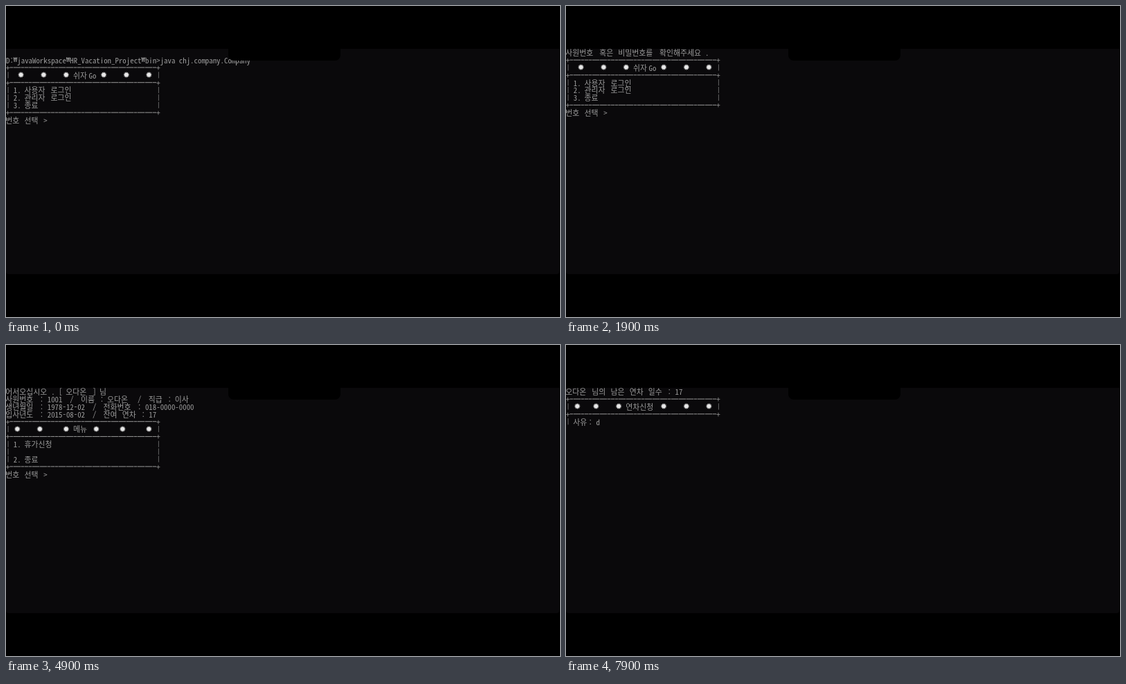
Write an HTML page that moves like this. It is 800 px wide and 450 px high and loops after 8000 ms.

```html
<!DOCTYPE html>
<html lang="ko">
<head>
<meta charset="utf-8">
<title>Console</title>
<style>
html, body { margin: 0; width: 100%; height: 100%; overflow: hidden; background: #000; }
#stage { position: absolute; left: 0; top: 0; width: 800px; height: 450px; overflow: hidden; background: #000; }
#console { position: absolute; left: 0; top: 62px; width: 799px; height: 326px; overflow: hidden;
  background: #0a090b; border-radius: 0 0 4px 4px; }
#notch { position: absolute; left: 320.5px; top: 0; width: 162px; height: 16.5px; background: #000;
  border-radius: 0 0 8px 8px; }
/* 8 x 16 character grid, shown at reduced size */
#grid { position: absolute; left: 0; top: 0; transform-origin: 0 0; transform: scale(.6788);
  font: 16px/16px "Noto Sans Mono CJK KR", "Noto Sans CJK KR", "Noto Sans CJK", monospace; color: #9c9c9c; }
#grid span { position: absolute; height: 16px; white-space: pre; font-kerning: none; }
#grid .hangul { margin-left: -1px; }
#grid .rule { color: transparent; overflow: hidden;
  background: repeating-linear-gradient(90deg, #959595 0 7px, #4a4a4a 7px 8px) 0 7.2px / 100% 1.5px no-repeat; }
#grid .bar { width: 8px; color: transparent; overflow: hidden;
  background: linear-gradient(#8c8c8c, #8c8c8c) 3.5px 1px / 1.4px 13.5px no-repeat; }
#grid .star { width: 16px; text-align: center; color: #e8e8e8; font-family: "DejaVu Sans", sans-serif; font-size: 18px; }
#grid .won { font-family: "DejaVu Sans Mono", monospace; font-size: 13.3px; }
#grid .caret { width: 8px; height: 4px; background: #d8d8d8; }
</style>
</head>
<body>
<div id="stage">
  <div id="console">
    <div id="grid"></div>
    <div id="notch"></div>
  </div>
</div>
<script>
const CW = 8, CH = 16, LOOP = 8000;
const grid = document.getElementById('grid');

const rule = '+' + '-'.repeat(39) + '+';
const side = s => '| ' + s;
const isHangul = s => /^[가-힣]/.test(s);
const cols = s => [...s].reduce((n, c) => n + (c === '*' || isHangul(c) ? 2 : 1), 0);
const item = s => side(s) + ' '.repeat(38 - cols(s)) + '|';
const box = (title, items) => [rule, title, rule, ...items.map(item), rule, '번호 선택 > '];

const user = '오다온';
const home = box('|  *    *    * 쉬자Go *    *    * |', ['1. 사용자 로그인', '2. 관리자 로그인', '3. 종료']);
const login = [
  side('쉬자Go 로그인을 시작합니다.'),
  side('사원번호와 비밀번호를 입력해주세요.'),
  side('사원번호 입력 : ')
];

// Input is appended to the last line of a screen.
const screens = {
  blank: [''],
  start: ['', 'D:₩javaWorkspace₩HR_Vacation_Project₩bin>java chj.company.Company', ...home],
  retry: ['사원번호 혹은 비밀번호를 확인해주세요.', ...home],
  login,
  pass: [login[0], login[1], login[2] + '1001', side('비밀번호 입력 : ')],
  menu: [
    `어서오십시오. [ ${user} ] 님`,
    `사원번호 : 1001  /  이름 : ${user}  /  직급 : 이사`,
    '생년월일 : 1978-12-02  /  전화번호 : 018-0000-0000',
    '입사년도 : 2015-08-02  /  잔여 연차 : 17',
    ...box('| *    *     * 메뉴 *     *     * |', ['1. 휴가신청', '', '2. 종료'])
  ],
  kind: box('| *     *     * 메뉴 *    *     * |', ['1. 연차신청', '2. 병가신청', '3. 종료']),
  leave: [
    `${user} 님의 남은 연차 일수 : 17`,
    rule, '| *   *    * 연차신청 *    *    * |', rule,
    side('사유: ')
  ]
};

// [time, screen, input, caret shown]
const steps = [
  [0, 'start', '', 0], [400, 'start', '', 1], [500, 'start', '1', 0], [600, 'blank', '', 0],
  [700, 'login', '', 0], [900, 'login', '1', 0], [1000, 'login', '10', 0], [1100, 'login', '100', 0],
  [1200, 'login', '1001', 1], [1300, 'login', '1001', 0], [1400, 'pass', '', 1], [1500, 'pass', '1', 0],
  [1600, 'pass', '123', 0], [1700, 'pass', '1234', 1], [1800, 'blank', '', 0],
  [1900, 'retry', '', 0], [2100, 'retry', '', 1], [2300, 'retry', '', 0], [2500, 'retry', '', 1],
  [2600, 'retry', '', 0], [2700, 'retry', '1', 0], [2800, 'retry', '1', 1], [2900, 'blank', '', 0],
  [3000, 'login', '', 0], [3200, 'login', '', 1], [3400, 'login', '1', 0], [3500, 'login', '100', 0],
  [3600, 'login', '1001', 1], [3700, 'login', '1001', 0], [3900, 'pass', '', 1], [4100, 'pass', '1', 0],
  [4200, 'pass', '11', 0], [4300, 'pass', '111', 0], [4400, 'pass', '1111', 0], [4600, 'pass', '1111', 1],
  [4800, 'blank', '', 0], [4900, 'menu', '', 0], [5100, 'menu', '', 1], [5300, 'menu', '', 0],
  [5500, 'menu', '', 1], [5700, 'menu', '', 0], [5800, 'menu', '1', 0], [6000, 'menu', '1', 1],
  [6100, 'blank', '', 0], [6200, 'kind', '', 0], [6400, 'kind', '', 1], [6600, 'kind', '', 0],
  [6700, 'kind', '', 1], [6900, 'kind', '', 0], [7000, 'kind', '1', 0], [7100, 'kind', '1', 1],
  [7200, 'blank', '', 0], [7300, 'leave', '', 1], [7400, 'leave', '', 0], [7600, 'leave', '', 1],
  [7800, 'leave', '', 0], [7900, 'leave', 'd', 0]
];

function put(text, col, y, name = '') {
  const el = document.createElement('span');
  el.textContent = text;
  el.className = name;
  el.style.left = col * CW + 'px';
  el.style.top = y + 'px';
  grid.append(el);
}

function kindOf(part) {
  if (part.startsWith('---')) return 'rule';
  if (isHangul(part)) return 'hangul';
  return { '*': 'star', '|': 'bar', '₩': 'won' }[part] || '';
}

function drawLine(line, row) {
  let col = 0;
  for (const part of line.match(/\s+|-{9,}|[*|₩]|[가-힣]+|[^\s*|₩가-힣+]+|\+/g) || []) {
    if (part.trim()) put(part === '*' ? '✹' : part, col, row * CH, kindOf(part));
    col += cols(part);
    if (part.startsWith('---')) grid.lastChild.style.width = part.length * CW + 'px';
  }
}

function draw([, name, input, caret]) {
  grid.replaceChildren();
  const lines = screens[name].slice();
  const last = lines.length - 1;
  lines[last] += input;
  lines.forEach(drawLine);
  if (caret) put('', cols(lines[last]), last * CH + 12, 'caret');
}

let shown;
function tick() {
  const t = performance.now() % LOOP;
  const step = steps.findLast(s => s[0] <= t);
  if (step !== shown) draw(shown = step);
  requestAnimationFrame(tick);
}
tick();
</script>
</body>
</html>
```
